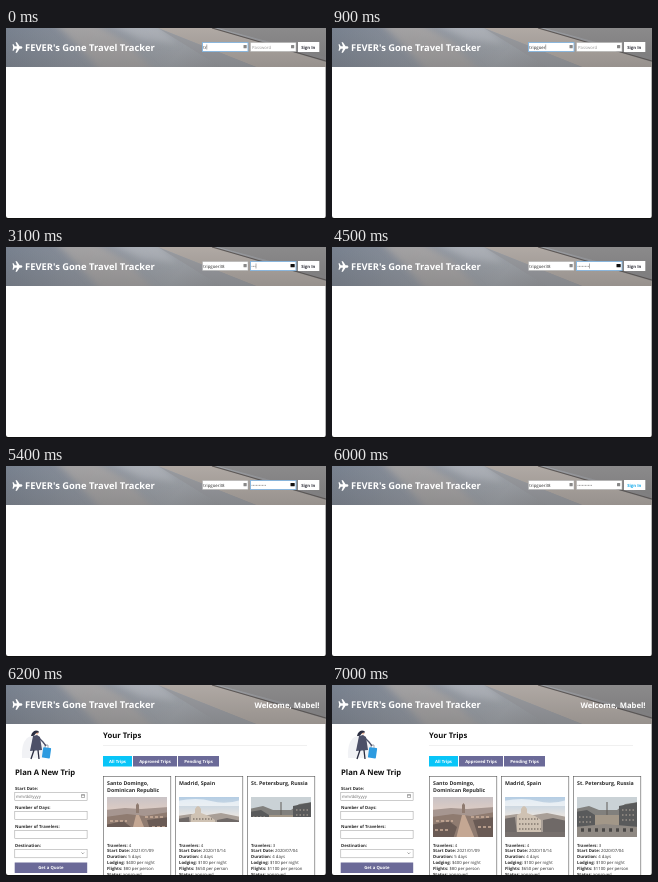
An HTML page for the animation above (7.1 s loop, 320 px wide and 191 px high).

```html
<!DOCTYPE html>
<html lang="en">
<head>
<meta charset="utf-8">
<title>Travel tracker sign-in</title>
<style>
html, body { margin: 0; width: 100%; height: 100%; overflow: hidden; background: #fff; }
#stage { display: block; width: 100vw; height: 100vh; }
text { font-family: "Open Sans", sans-serif; font-size: 4.25px; fill: #2b2b2b; text-rendering: geometricPrecision; white-space: pre; }
.b { font-weight: 700; }
.h { font-weight: 700; font-size: 7.7px; fill: #111; }
.w { fill: #fff; }
.field { fill: #fff; stroke: #aaa; stroke-width: .5; }
.card { fill: none; stroke: #555; stroke-width: .6; }
.purple { fill: #6b6a98; }
</style>
</head>
<body>
<svg id="stage" viewBox="0 0 320 191">
  <defs>
    <linearGradient id="air" x2="1" y2=".1">
      <stop offset="0" stop-color="#78818f"/><stop offset=".3" stop-color="#8f959f"/>
      <stop offset=".6" stop-color="#a0a4aa"/><stop offset="1" stop-color="#8d8c8e"/>
    </linearGradient>
    <linearGradient id="shade" x2="0" y2="1">
      <stop offset="0" stop-color="#333" stop-opacity="0"/><stop offset="1" stop-color="#333" stop-opacity=".2"/>
    </linearGradient>
    <linearGradient id="dusk" x2="0" y2=".5">
      <stop offset="0" stop-color="#c9c3c6"/><stop offset="1" stop-color="#e6cfc1"/>
    </linearGradient>
    <linearGradient id="day" x2="0" y2="1">
      <stop offset="0" stop-color="#b4cde4"/><stop offset=".5" stop-color="#ece6e0"/>
    </linearGradient>
    <filter id="soft"><feGaussianBlur stdDeviation="3"/></filter>
    <filter id="blur"><feGaussianBlur stdDeviation=".5"/></filter>
    <clipPath id="top"><path d="M0 0H320V39H0Z"/></clipPath>
  </defs>
  <rect width="320" height="191" fill="#fff"/>

  <g clip-path="url(#top)">
    <path d="M0 0H320V39H0Z" fill="url(#air)"/>
    <g filter="url(#soft)">
      <path d="M48 -5L74 20 96 45H150L120 14 88 -5Z" fill="#aba7a6" opacity=".75"/>
      <path d="M100 -5H150L172 16 136 12Z" fill="#b9bdc4" opacity=".6"/>
    </g>
    <path d="M152 0H206L320 34V39H250Z" fill="#b0a9a4"/>
    <path d="M152 0L250 39H215Z" fill="#9a9ca1"/>
    <path d="M212 0H320V29Z" fill="#8b8a8b"/>
    <path d="M206 0L320 33" stroke="#5f5a58" stroke-width="1.2"/>
    <path d="M0 0H320V39H0Z" fill="url(#shade)"/>
  </g>
  <path class="w" d="M6.500 16.200h1.100l1.100 2.100h2.300l-1.500-4h1.400l2.700 4h1.700q1.100.4 1.100 1.200t-1.100 1.200h-1.700l-2.700 4H9.500l1.500-4H8.700l-1.100 2.100H6.500l.7-3.300Z"/>
  <text class="b w" x="19" y="23" style="font-size:9.4px">FEVER's Gone Travel Tracker</text>

  <g id="login">
    <rect id="userBox" class="field" x="196.5" y="14.5" width="45.5" height="9"/>
    <rect id="passBox" class="field" x="244.5" y="14.5" width="45.5" height="9"/>
    <text id="user" x="197.3" y="20.7" style="font-size:4.35px"></text>
    <text id="hint" x="246" y="20.7" style="fill:#999">Password</text>
    <g id="dots"></g>
    <rect id="caret" y="16.5" width=".4" height="5" fill="#333"/>
    <rect id="userIcon" x="237.5" y="17" width="3.2" height="3.2" rx=".5"/>
    <rect id="passIcon" x="285" y="17" width="3.2" height="3.2" rx=".5"/>
    <rect x="292" y="14" width="21.3" height="10" fill="#fff"/>
    <text id="sign" class="b" x="302.3" y="20.7" text-anchor="middle">Sign In</text>
  </g>

  <g id="page">
    <text class="h w" x="313.5" y="22.8" text-anchor="end" style="fill:#fff">Welcome, Mabel!</text>

    <path d="M16 73q-1-14 5-20 8-6 14 2 6 8 2 18Z" fill="#f1f2f5"/>
    <path d="M27 51l4-1 3 2 2 13-12 1Z" fill="#4c5068"/>
    <path d="M28 65l-3 9M32 65l1 9" stroke="#2a2d40" stroke-width="1.300"/>
    <path d="M33 53l4 4 3 4" fill="none" stroke="#4c5068" stroke-width="1.300"/>
    <circle cx="31" cy="48" r="1.500" fill="#e5b59b"/>
    <path d="M25 51q1-5 5-5.500 3 0 3 2-3-.5-4 2-1 2-4 1.500Z" fill="#2a2d40"/>
    <path d="M39 63v-3h3v3" fill="none" stroke="#556" stroke-width=".5"/>
    <rect x="36.500" y="62.500" width="8" height="10.500" rx=".8" fill="#2d9be0" transform="rotate(8 40 68)"/>

    <text class="h" x="9" y="90">Plan A New Trip</text>
    <g id="form"></g>
    <text x="10" y="113" style="fill:#666">mm/dd/yyyy</text>
    <path d="M75.500 109.500h3v3h-3ZM75.500 110.300h3" fill="none" stroke="#444" stroke-width=".4"/>
    <path d="M75.500 167.500l1.300 1.300 1.300-1.300" fill="none" stroke="#444" stroke-width=".5"/>
    <rect class="purple" x="8.700" y="177.500" width="72.500" height="10.500"/>
    <text class="b w" x="44.900" y="184.200" text-anchor="middle">Get a Quote</text>

    <text class="h" x="97" y="53">Your Trips</text>
    <path d="M97 60.500H301" stroke="#e6e6e6" stroke-width=".6"/>
    <g id="tabs"></g>
    <g id="cards"></g>

    <svg class="photo" x="101" y="112" width="60" height="40">
      <path d="M0 0H60V40H0Z" fill="url(#dusk)"/>
      <g filter="url(#blur)">
        <path d="M-2 13l20-2 16 1 28-2V42H-2Z" fill="#a69690"/>
        <path d="M-2 20l22-3 18 2 24-4V42H-2Z" fill="#8f7b70"/>
        <path d="M-2 28l18-4 8 6-4 12H-2ZM40 23l22-3V42H46Z" fill="#6a5b55"/>
        <path d="M23 42l6-24h3l10 24Z" fill="#c4a793"/>
        <path d="M3 24h17M38 20h18M2 33h15M45 30h13" stroke="#cdb09a" stroke-width="1.500" stroke-dasharray="3 2"/>
        <path d="M29 16V8l1.500-2L32 8v8Z" fill="#8f7b70"/>
      </g>
    </svg>
    <svg class="photo" x="173" y="112" width="60" height="40">
      <path d="M0 0H60V40H0Z" fill="url(#day)"/>
      <g filter="url(#blur)">
        <path d="M-2 4q20-4 34 0t30-1v6H-2Z" fill="#fff" opacity=".6"/>
        <path d="M-2 19l14-2 10 2 20-3 20 4V42H-2Z" fill="#a99f97"/>
        <path d="M12 36V18l4-2v-4q3-6 6 0v4l8 3 6 4v13Z" fill="#cfc2b3"/>
        <path d="M14 22h19M14 27h21M14 32h22" stroke="#83786f" stroke-width="1.700" stroke-dasharray="1.500 1.500"/>
        <path d="M-2 22l12-2 2 17H-2ZM38 23l10-2 14 3v13H38Z" fill="#6f6967"/>
        <path d="M-2 35h64v7H-2Z" fill="#77706d"/>
      </g>
    </svg>
    <svg class="photo" x="245" y="112" width="60" height="40">
      <path d="M0 0H60V40H0Z" fill="#cad2d6"/>
      <g filter="url(#blur)">
        <path d="M-2 12l14-3 10 4h18l8-6 14-2V42H-2Z" fill="#81807d"/>
        <path d="M-2 15l12-2 8 5v14H-2ZM42 9l20-4v27H42Z" fill="#595a5b"/>
        <path d="M18 18h24v10H18Z" fill="#a29788"/>
        <path d="M2 20h14M2 25h14M45 13h13M45 18h13M45 23h13" stroke="#989189" stroke-width="1.300" stroke-dasharray="1.500 2"/>
        <path d="M30 18V5" stroke="#5f5b57" stroke-width="1"/>
        <path d="M-2 30l30-3 34 3v12H-2Z" fill="#8f8983"/>
        <path d="M4 33h54" stroke="#494746" stroke-width="3.500" stroke-dasharray="3 4"/>
      </g>
    </svg>
  </g>

  <path d="M319.500 39V190" stroke="#999" stroke-width=".7"/>
  <path d="M0 188q0 2 2 2H318q2 0 2-2v3H0Z" fill="#111"/>
</svg>
<script>
const LOOP = 7100;
const NAME = "tripgoer38";
const nameTimes = [0, 0, 200, 400, 600, 800, 800, 900, 1800, 2000];
const dotTimes = [2800, 2900, 3100, 3400, 3700, 3800, 4300, 4500, 4600, 4800];
const $ = id => document.getElementById(id);
const clamp = v => Math.min(1, Math.max(0, v));
const set = (id, attrs) => { for (const k in attrs) $(id).setAttribute(k, attrs[k]); };
const show = (id, on) => $(id).style.display = on ? "" : "none";
const rect = (cls, x, y, w, h, extra = "") =>
  `<rect class="${cls}" x="${x}" y="${y}" width="${w}" height="${h}" ${extra}/>`;
const text = (cls, x, y, str, extra = "") => `<text class="${cls}" x="${x}" y="${y}" ${extra}>${str}</text>`;

$("form").innerHTML = ["Start Date:", "Number of Days:", "Number of Travelers:", "Destination:"]
  .map((label, i) => text("b", 9, 104.6 + i * 19.1, label) +
    rect("field", 8.8, 107.3 + i * 19.1, 72.3, 8.2, 'style="stroke:#999"')).join("");

$("tabs").innerHTML = [["All Trips", 97, 29], ["Approved Trips", 127, 44], ["Pending Trips", 172, 41]]
  .map(([label, x, w], i) => rect("purple", x, 71, w, 10.5, i ? "" : 'style="fill:#08c5f8"') +
    text("b w", x + w / 2, 77.7, label, 'text-anchor="middle"')).join("");

const trips = [
  [["Santo Domingo,", "Dominican Republic"], 4, "2021/01/09", 5, 400, 80],
  [["Madrid, Spain"], 4, "2020/10/14", 4, 100, 650],
  [["St. Petersburg, Russia"], 3, "2020/07/04", 4, 100, 1100],
];
$("cards").innerHTML = trips.map(([title, people, date, days, bed, fare], i) => {
  const x = 101 + i * 72;
  const rows = [["Travelers", people], ["Start Date", date], ["Duration", days + " days"],
    ["Lodging", `$${bed} per night`], ["Flights", `$${fare} per person`], ["Status", "approved"]];
  return rect("card", x - 3.5, 91.5, 67.3, 110) +
    title.map((line, n) => text("b", x, 100.2 + n * 6.6, line, 'style="font-size:5.25px"')).join("") +
    rows.map(([key, value], n) =>
      text("", x, 161.5 + n * 5.8, `<tspan class="b">${key}:</tspan> ${value}`)).join("");
}).join("");

$("dots").innerHTML = dotTimes.map((_, i) => `<circle cx="${246 + i * 1.5}" cy="19.2" r=".45" fill="#444"/>`).join("");

function draw(t) {
  const typed = times => times.filter(at => at <= t).length;
  const letters = typed(nameTimes), dots = typed(dotTimes);
  const onUser = t < 2300, onPass = !onUser && t < 5600, inside = t >= 6100;
  show("login", !inside);
  show("page", inside);

  $("user").textContent = NAME.slice(0, letters);
  for (const [id, on] of [["userBox", onUser], ["passBox", onPass]])
    $(id).style.cssText = on ? "stroke:#84b4de;stroke-width:.9" : "";
  [...$("dots").children].forEach((dot, i) => dot.style.display = i < dots ? "" : "none");
  show("hint", !dots);
  set("userIcon", { fill: "#888" });
  set("passIcon", onPass && dots
    ? { fill: "#111", x: 284.5, width: 4.2 }
    : { fill: "#888", x: 285, width: 3.2 });

  // The caret blinks 500 ms after the last keystroke or focus change.
  const lastKey = Math.max(...[...nameTimes, 2300, ...dotTimes].filter(at => at <= t));
  const blinkOn = Math.floor((t - lastKey) / 500) % 2 === 0;
  show("caret", (onUser || onPass) && blinkOn);
  if (!inside) set("caret", { x: onUser ? 197.4 + $("user").getComputedTextLength() : 245.3 + dots * 1.5 });

  const hover = clamp((t - 5500) / 300);
  const mix = (from, to) => from + (to - from) * hover;
  $("sign").style.fill = `rgb(${mix(50, 20)},${mix(50, 170)},${mix(60, 235)})`;

  // Photos load from the top down, one slightly after another.
  const step = Math.floor(t / 100) * 100;
  document.querySelectorAll(".photo").forEach((photo, i) =>
    photo.setAttribute("height", 40 * clamp((step - 6050 - i * 25) / 200)));
}

const start = performance.now();
function tick() {
  draw((performance.now() - start) % LOOP);
  requestAnimationFrame(tick);
}
tick();
</script>
</body>
</html>
```
